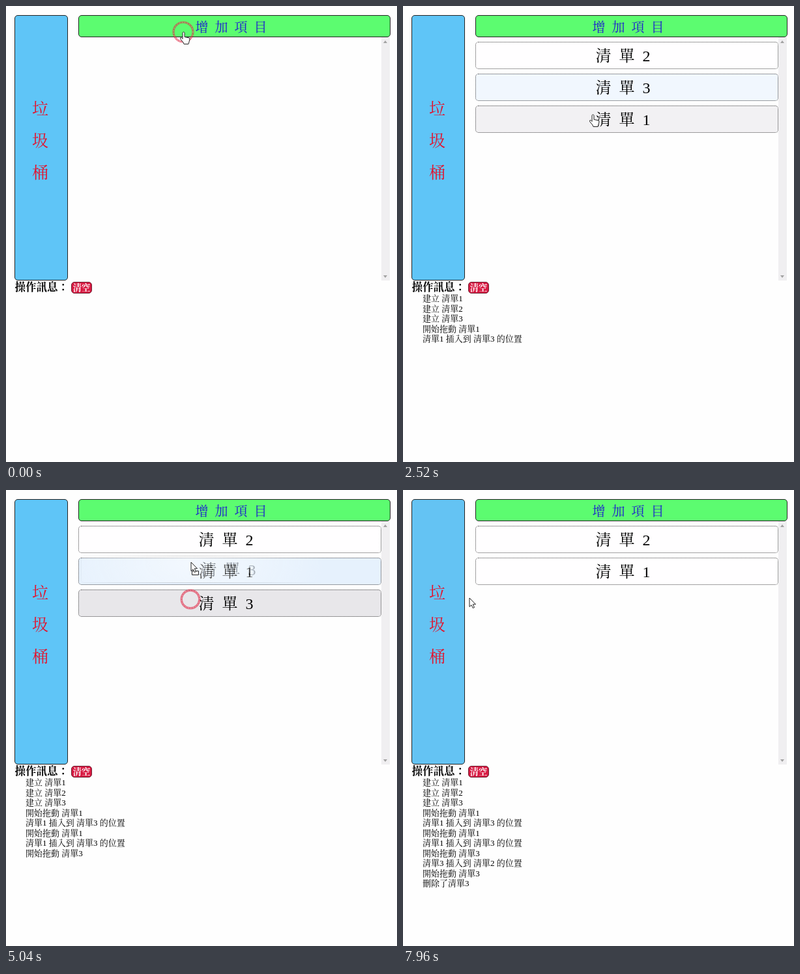
Animation, 600 px wide and 701 px high, one loop 8 s. Source, as an HTML page:

```html
<!DOCTYPE html>
<html lang="zh-Hant">
<head>
<meta charset="utf-8">
<title>清單拖放</title>
<style>
html, body { margin: 0; width: 100%; height: 100%; overflow: hidden; background: #fefefe; }
body { font-family: "Liberation Serif", "Noto Serif CJK TC", "Noto Sans CJK TC", "Noto Sans CJK", serif; color: #000; }
#stage { position: relative; width: 600px; height: 701px; overflow: hidden; }
#stage * { position: absolute; box-sizing: border-box; white-space: nowrap; }
#trash { left: 13px; top: 14px; width: 82px; height: 408px; border: 1px solid #222; border-radius: 5px; }
#trash span { left: 0; width: 77px; text-align: center; font-size: 25px; line-height: 49px; color: #e3122c; }
#add { left: 111px; top: 14px; width: 479px; height: 34px; border: 1px solid #222; border-radius: 5px; background: #5cfc70; color: #1c1cd0; font-size: 20px; line-height: 37px; letter-spacing: 10px; text-align: center; }
#add.focus { border-color: #3768c8; box-shadow: 0 0 0 1px #a9c3ee; }
.item { left: 111px; width: 465px; height: 42px; border: 1px dotted #444; border-radius: 5px; font-size: 24px; font-weight: 300; line-height: 43px; letter-spacing: 12px; text-align: center; }
#ghost { top: 0; left: 0; background: #fff; opacity: .5; }
#bar { left: 576px; top: 48px; width: 13px; height: 374px; background: #f0eff1; }
#bar i { left: 3px; border: 3.5px solid transparent; }
#bar .up { top: 1.5px; border-bottom: 4px solid #a2a2a2; }
#bar .down { bottom: 1.5px; border-top: 4px solid #a2a2a2; }
#head { left: 13.5px; top: 421px; font-size: 16.5px; font-weight: bold; line-height: 24px; }
#clear { left: 100px; top: 424px; width: 32px; height: 18px; border: 1px solid #6d2434; border-radius: 5px; background: #d81b43; color: #fff; font-size: 13.3px; font-weight: bold; line-height: 17px; text-align: center; }
.log { left: 30px; font-size: 13px; line-height: 15.5px; }
svg { left: 0; top: 0; }
</style>
</head>
<body>
<div id="stage">
  <div id="trash"></div>
  <div id="add">增加項目</div>
  <div id="bar"><i class="up"></i><i class="down"></i></div>
  <div id="head">操作訊息：</div>
  <div id="clear">清空</div>
  <div id="ghost" class="item"></div>
  <svg width="600" height="701">
    <g id="ring" fill="none">
      <circle id="glow" stroke="#e0203f"/>
      <circle id="dots" stroke="#fff" stroke-dasharray="1.5 2.5" opacity=".55"/>
    </g>
    <g id="cursor" fill="#fff" stroke="#222" stroke-linejoin="round">
      <path id="hand" d="M-1 1.5C-1-.5 2-.5 2 1.5V7.5L8 8.7Q10 9.2 10 11L9 15 8 18.5H1L0 16-4.5 10.5Q-5 8.5-3 8.5L-1 10.5Z"/>
      <g id="arrow">
        <rect id="badge" x="1.5" y="13.5" width="10" height="6"/>
        <path d="M0 0V13.5L3 10.8 5.3 15.5 7.5 14.5 5.3 9.8H9.5Z"/>
      </g>
    </g>
  </svg>
</div>
<script>
const LOOP = 8000, STEP = 10, FADE = 500, RING = 620;
const TOP = 55, PITCH = 49, LEFT = 111;
const WHITE = [255, 254, 255], GREY = [232, 231, 234], BLUE = [210, 231, 252];
const SKY = [95, 197, 247], DULL = [140, 176, 210];

const $ = id => document.getElementById(id);
const stage = $('stage');
const rowTop = row => TOP + PITCH * row;
const label = item => '清單' + item.no;
const mix = (a, b, k) => a.map((v, i) => v + (b[i] - v) * k);
const clamp = x => Math.min(1, Math.max(0, x));
const smooth = x => x * x * (3 - 2 * x);
const show = (el, on) => { el.style.display = on ? '' : 'none'; };

// What the user does; everything else follows from it.
const presses = [0, 1, 2].map(i => 120 + 390 * i);
const drags = [
  { down: 1420, grab: 1620, drop: 2340 },
  { down: 2920, grab: 3220, drop: 3840 },
  { down: 4540, grab: 4700, drop: 5580 },
  { down: 6590, grab: 6740, drop: 7640 }
];
const home = [272, 40];
const moves = [
  { at: 1180, take: 220, to: [285, 80] },
  { at: 1640, take: 600, to: [291, 167] },
  { at: 3240, take: 400, to: [281, 114] },
  { at: 3850, take: 160, to: [283, 168] },
  { at: 4750, take: 280, to: [284, 111] },
  { at: 5060, take: 260, to: [304, 82] },
  { at: 6200, take: 120, to: [268, 78] },
  { at: 6760, take: 640, to: [88, 166] },
  { at: 7660, take: 120, to: [102, 166] }
];
const downs = [-560, ...presses, ...drags.map(d => d.down)];

const cursorAt = t => moves.reduce((p, m) => mix(p, m.to, smooth(clamp((t - m.at) / m.take))), home);
const dragAt = t => drags.find(d => t >= d.grab && t < d.drop);

function rowAt([x, y]) {
  const row = Math.floor((y - TOP) / PITCH);
  return x > LEFT && x < 576 && y < rowTop(row) + 42 ? row : -1;
}

function addText(tag, cls, text, top, parent) {
  const el = document.createElement(tag);
  el.className = cls;
  el.textContent = text;
  el.style.top = top + 'px';
  parent.append(el);
  return el;
}

// A colour that eases to each new value it is given.
class Fader {
  constructor(colour) { this.fades = [{ at: -FADE, from: colour, to: colour }]; }
  get last() { return this.fades[this.fades.length - 1]; }
  set(at, to) {
    if (to !== this.last.to) this.fades.push({ at, from: this.value(at), to });
  }
  reset(at) { this.fades.push({ at, from: WHITE, to: WHITE }); }
  value(t) {
    const { at, from, to } = this.fades.filter(f => f.at <= t).pop();
    return mix(from, to, smooth(clamp((t - at) / FADE) ** .58));
  }
  css(t) { return `rgb(${this.value(t).map(Math.round)})`; }
}

const items = presses.map((_, i) => ({
  no: i + 1,
  fader: new Fader(WHITE),
  el: addText('div', 'item', '清單' + (i + 1), 0, stage)
}));
const trash = new Fader(SKY);
const orders = [{ at: 0, list: [] }];
const logs = [];
stage.append($('ghost'), document.querySelector('svg'));
[...'垃圾桶'].forEach((ch, i) => addText('span', '', ch, 119 + PITCH * i, $('trash')));

function log(at, text) {
  logs.push({ at, el: addText('div', 'log', text, 442 + 15.5 * logs.length, stage) });
}

// Run the page logic once to learn when things change.
function rehearse() {
  let list = [];
  const reorder = (at, next) => orders.push({ at, list: list = next });
  for (let t = 0; t < LOOP; t += STEP) {
    const pos = cursorAt(t), row = rowAt(pos);
    const created = items[presses.indexOf(t - 60)];
    if (created) {
      reorder(t, [...list, created]);
      log(t, '建立 ' + label(created));
    }
    for (const d of drags) {
      if (t === d.grab) {
        Object.assign(d, { item: list[row], row, from: pos });
        log(t, '開始拖動 ' + label(d.item));
      }
      if (t === d.drop) {
        const rest = list.filter(it => it !== d.item);
        if (row < 0) {
          log(t, '刪除了' + label(d.item));
        } else {
          log(t, `${label(d.item)} 插入到 ${label(list[row])} 的位置`);
          rest.splice(row, 0, d.item);
        }
        reorder(t, rest);
        d.item.fader.reset(t);
      }
    }
    const drag = dragAt(t);
    list.forEach((item, i) => {
      const grey = drag ? item === drag.item : i === row;
      item.fader.set(t, grey ? GREY : i === row ? BLUE : WHITE);
    });
    trash.set(t, drag && pos[0] < 95 ? DULL : SKY);
  }
}

function drawRing(t) {
  const down = downs.filter(d => d <= t).pop();
  const p = (t - down) / RING, r = 3.5 + 12.7 * p;
  show($('ring'), p < 1);
  const [x, y] = cursorAt(down);
  $('ring').setAttribute('transform', `translate(${x} ${y})`);
  $('ring').setAttribute('opacity', clamp(1 - .5 * p));
  $('glow').setAttribute('r', r);
  $('glow').setAttribute('stroke-width', Math.max(1, 5 - 2 * p));
  $('dots').setAttribute('r', r);
}

function drawDrag(t, [x, y]) {
  const drag = dragAt(t), ghost = $('ghost');
  const binned = t >= drags[3].drop;
  show(ghost, drag);
  show($('hand'), !drag && !binned);
  show($('arrow'), drag || binned);
  show($('badge'), drag && drag !== drags[1]);
  if (!drag) return;
  const [gx, gy] = [drag.from[0] - LEFT - 3, drag.from[1] - rowTop(drag.row) - 5];
  ghost.textContent = label(drag.item);
  ghost.style.transform = `translate(${x - gx}px, ${y - gy}px)`;
  ghost.style.maskImage = ghost.style.webkitMaskImage =
    `radial-gradient(210px 110px at ${gx}px ${gy}px, #000, transparent)`;
}

function draw(t) {
  const { list } = orders.filter(o => o.at <= t).pop();
  for (const item of items) {
    const row = list.indexOf(item);
    show(item.el, row >= 0);
    item.el.style.top = rowTop(row) + 'px';
    item.el.style.background = item.fader.css(t);
  }
  for (const { at, el } of logs) show(el, t >= at);
  $('trash').style.background = trash.css(t);
  $('add').classList.toggle('focus', t >= presses[0] && t < drags[0].down);
  const pos = cursorAt(t);
  $('cursor').setAttribute('transform', `translate(${pos})`);
  drawRing(t);
  drawDrag(t, pos);
}

rehearse();
const begin = performance.now();
function tick() {
  draw((performance.now() - begin) % LOOP);
  requestAnimationFrame(tick);
}
tick();
</script>
</body>
</html>
```
